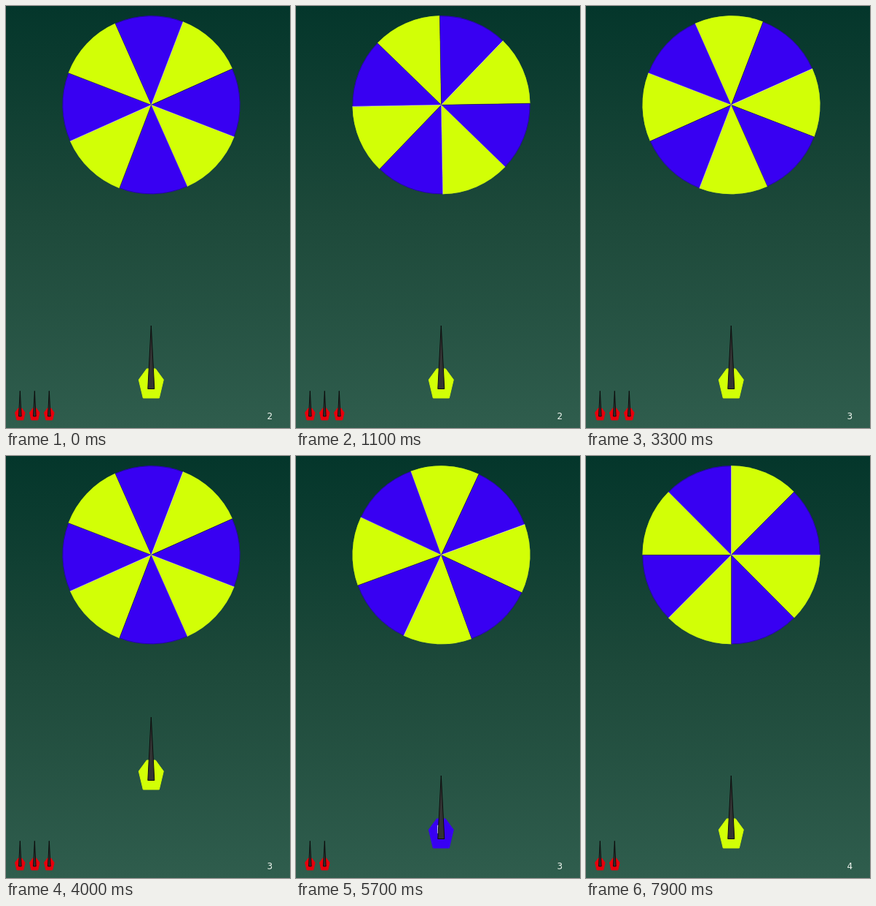
An HTML page with a canvas for the animation above (8 s loop, 390x577 px).

```html
<!DOCTYPE html>
<html lang="en">
<head>
<meta charset="utf-8">
<title>Dart wheel</title>
<style>
  html, body { margin: 0; width: 100%; height: 100%; overflow: hidden; background: #05372c; }
  canvas { display: block; }
</style>
</head>
<body>
<canvas id="stage" width="390" height="577"></canvas>
<script>
const ctx = document.getElementById('stage').getContext('2d');
const LOOP = 8000, STEP = 100;
const YELLOW = '#d2ff06', BLUE = '#3800f2', RED = '#e6000c';
const CX = 199.5, CY = 135.3, R = 122, FLIGHT = 180;

// The wheel stands still from each hit until the next turn starts.
const TURNS = [
  { start: 0, launch: 1790, hit: 2000, color: YELLOW, score: 2, lives: 3 },
  { start: 3100, launch: 3840, hit: 4200, color: YELLOW, score: 3, lives: 3 },
  { start: 5200, launch: 6060, hit: 6300, color: BLUE, score: 3, lives: 2 },
  { start: 7400, launch: 9000, hit: 9500, color: YELLOW, score: 4, lives: 2 },
];
// [time, degrees] between which the wheel turns evenly
const SPIN = [[0, 21], [500, -11], [1700, -82], [2000, -104], [3000, -104], [3300, -114],
  [4000, -159], [4200, -170], [5100, -170], [5700, -200], [6300, -236], [7300, -236], [7900, -270]];

const progress = (t, a, b) => Math.min(1, Math.max(0, (t - a) / (b - a)));

const wheelAngle = t => Math.round(SPIN.slice(1).reduce((angle, [end, to], i) => {
  const [begin, from] = SPIN[i];
  return angle + (to - from) * progress(t, begin, end);
}, SPIN[0][1]));

function polygon(points, scale, fill, stroke) {
  ctx.beginPath();
  points.forEach(([x, y]) => ctx.lineTo(x * scale, y * scale));
  ctx.closePath();
  ctx.fillStyle = fill;
  ctx.fill();
  ctx.strokeStyle = stroke;
  ctx.lineWidth = 1;
  ctx.stroke();
}

function drawBackground() {
  const g = ctx.createLinearGradient(0, 0, 0, 577);
  g.addColorStop(0, '#04362b');
  g.addColorStop(0.5, '#1d493a');
  g.addColorStop(1, '#2f5d4d');
  ctx.fillStyle = g;
  ctx.fillRect(0, 0, 390, 577);
}

// The angle is the clockwise end of one blue sector, measured from the top.
function drawWheel(angle) {
  const edge = i => (angle + 45 * i - 90) * Math.PI / 180;
  ctx.lineWidth = 1;
  for (let i = 0; i < 8; i++) {
    ctx.beginPath();
    ctx.moveTo(CX, CY);
    ctx.arc(CX, CY, R, edge(i), edge(i + 1));
    ctx.closePath();
    ctx.fillStyle = i % 2 ? BLUE : YELLOW;
    ctx.fill();
    ctx.beginPath();
    ctx.arc(CX, CY, R - 0.5, edge(i), edge(i + 1));
    ctx.strokeStyle = i % 2 ? 'rgba(25,0,110,.5)' : 'rgba(190,240,30,.5)';
    ctx.stroke();
  }
  // Bevelled seams: light where yellow lies below or to the right
  for (let i = 0; i < 8; i++) {
    const a = edge(i), side = i % 2 ? -1 : 1;
    const light = side * (0.8 * Math.cos(a) - 0.6 * Math.sin(a));
    const alpha = 0.2 + Math.abs(light) * 0.4;
    ctx.beginPath();
    ctx.moveTo(CX, CY);
    ctx.lineTo(CX + R * Math.cos(a), CY + R * Math.sin(a));
    ctx.strokeStyle = light > 0 ? `rgba(255,255,255,${alpha})` : `rgba(10,0,50,${alpha})`;
    ctx.stroke();
  }
}

function drawDart(x, tip, scale, color) {
  ctx.save();
  ctx.translate(x, tip);
  polygon([[-6, 60], [6, 60], [17, 75], [11, 100], [-11, 100], [-17, 75]], scale, color, color);
  if (color === BLUE) polygon([[-4.5, 69], [-3, 69], [-4.5, 80]], scale, '#eef', '#eef');
  polygon([[0, 1], [4.5, 87.5], [-4.5, 87.5]], scale, '#333', '#0c0c0c');
  ctx.restore();
}

function draw(now) {
  const t = Math.floor(now % LOOP / STEP) * STEP;
  const turn = TURNS.findLast(turn => t >= turn.start);
  const lift = FLIGHT * progress(t, turn.launch, turn.hit);
  drawBackground();
  drawWheel(wheelAngle(t));
  drawDart(199.3, 436 - Math.round(lift / 10) * 10, 1, turn.color);
  for (let i = 0; i < turn.lives; i++) drawDart(19.3 + 20 * i, 526, 0.4, RED);
  ctx.fillStyle = '#eef4ee';
  ctx.font = '12px "DejaVu Sans", sans-serif';
  ctx.fillText(turn.score, 358.5, 565);
}

let start;
function frame(now) {
  start ??= now;
  draw(now - start);
  requestAnimationFrame(frame);
}
draw(0);
requestAnimationFrame(frame);
</script>
</body>
</html>
```
